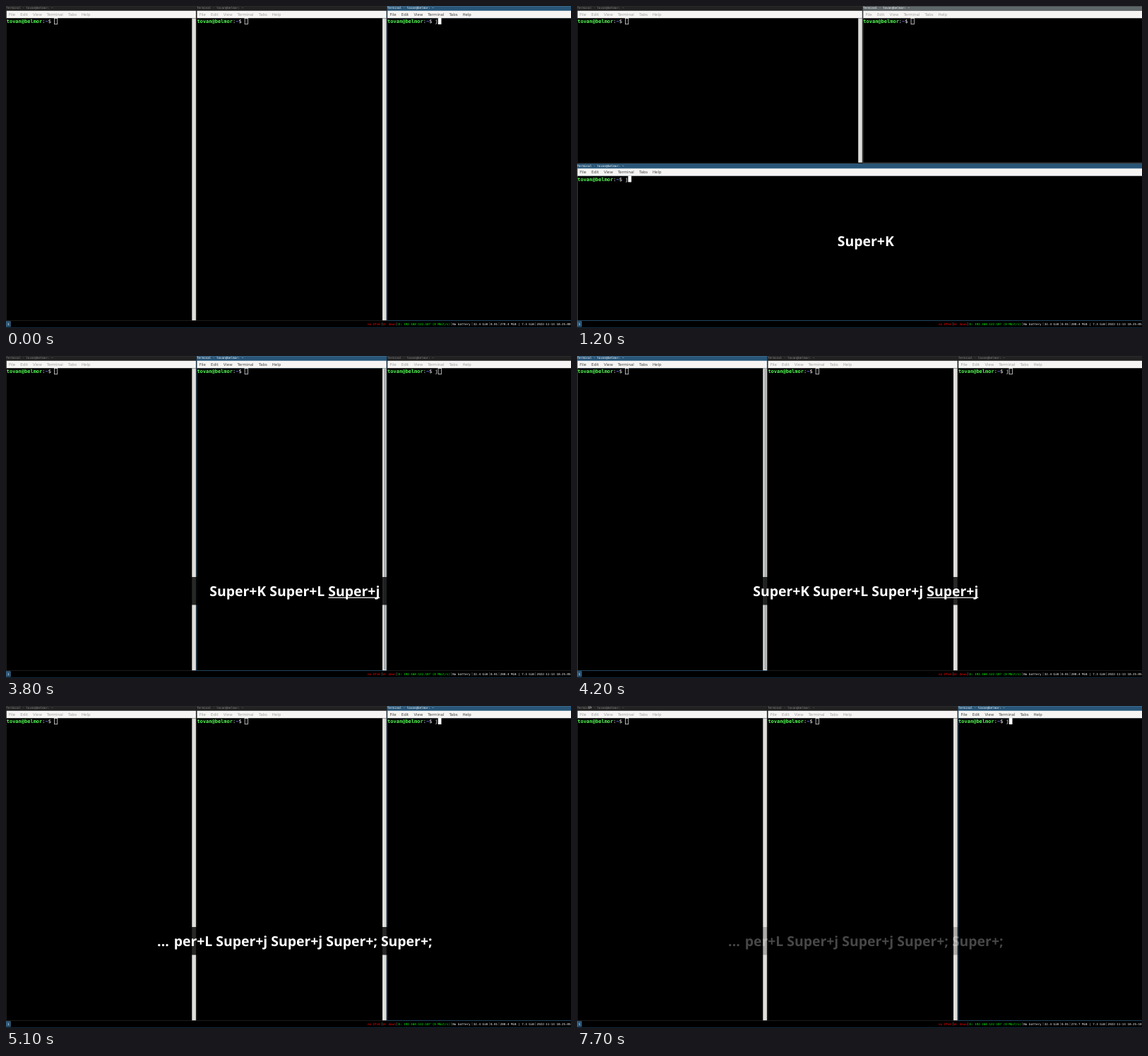
An HTML page with a canvas for the animation above (7.8 s loop, 800x456 px).

```html
<!DOCTYPE html>
<html lang="en">
<head>
<meta charset="utf-8">
<title>Tiling terminals</title>
<style>
html, body { margin: 0; width: 100%; height: 100%; overflow: hidden; background: #000; }
canvas { display: block; width: 800px; height: 456px; }
</style>
</head>
<body>
<canvas id="stage" width="800" height="456"></canvas>
<script>
const ctx = document.getElementById('stage').getContext('2d');
const LOOP = 7800, TICK = 100;
const MONO = '"DejaVu Sans Mono", monospace';
const SANS = '"DejaVu Sans", sans-serif';
const CAPTION = 'bold 19.4px "Noto Sans", "Open Sans", sans-serif';
const USER = 'tovan@belmor';
const MENU = [['File', 4], ['Edit', 20.3], ['View', 38], ['Terminal', 57.8], ['Tabs', 88], ['Help', 107]];

// Window places on a desktop that runs past the right edge: [x, y, width, height]
const COLUMNS = [[0, 0, 269.7, 446], [269.7, 0, 269.7, 446], [539.4, 0, 269.7, 446]];
const STACKED = [[0, 0, 404.6, 222.5], [404.6, 0, 404.6, 222.5], [0, 223.4, 809.2, 222.6]];

// Each key press: time, layout, focused window, older keys, newest key
const STEPS = [
  { at: -1000, layout: COLUMNS, focus: 2, old: '', key: '' },
  { at: 500, layout: STACKED, focus: 2, old: '', key: 'Super+K' },
  { at: 1800, layout: COLUMNS, focus: 2, old: 'Super+K ', key: 'Super+L' },
  { at: 3800, layout: COLUMNS, focus: 1, old: 'Super+K Super+L ', key: 'Super+j' },
  { at: 4100, layout: COLUMNS, focus: 0, old: 'Super+K Super+L Super+j ', key: 'Super+j' },
  { at: 4400, layout: COLUMNS, focus: 1, old: '...per+K Super+L Super+j Super+j ', key: 'Super+;' },
  { at: 4900, layout: COLUMNS, focus: 2, old: '...\u200a per+L Super+j Super+j Super+; ', key: 'Super+;' }
];

function rect(x, y, w, h, color) {
  ctx.fillStyle = color;
  ctx.fillRect(x, y, w, h);
}

// Small type is drawn scaled down so that its spacing stays fractional.
function text(str, x, y, size, color, family = MONO, weight = '') {
  ctx.save();
  ctx.translate(x, y);
  ctx.scale(size / 20, size / 20);
  ctx.font = `${weight} 20px ${family}`;
  ctx.fillStyle = color;
  ctx.fillText(str, 0, 0);
  const width = ctx.measureText(str).width * size / 20;
  ctx.restore();
  return x + width;
}

function prompt(x, y, typed, filled) {
  x = text(USER, x, y, 7, '#54ff54', MONO, 'bold');
  x = text(':', x, y, 7, '#fff');
  x = text('~', x, y, 7, '#7878ff', MONO, 'bold');
  x = text('$ ' + typed, x, y, 7, '#fff');
  if (filled) {
    rect(x, y - 7.1, 4.7, 8.9, '#fff');
  } else {
    ctx.strokeStyle = '#ddd';
    ctx.lineWidth = 0.8;
    ctx.strokeRect(x + 0.3, y - 6.7, 4.3, 8.2);
  }
}

function terminal([x, y, w, h], { focused, lastUsed, cursorOn, typed }) {
  const frame = focused ? '#285577' : lastUsed ? '#5f676a' : '#222';
  const edge = focused ? '#4c7899' : '#333';
  rect(x, y, w, h, frame);
  rect(x, y, w, 0.5, edge);
  rect(x, y + 6.1, w, 0.5, edge);
  text(`Terminal - ${USER}: ~`, x + 0.3, y + 4.2, 4.23, focused || lastUsed ? '#fff' : '#888');

  rect(x + 0.8, y + 6.8, w - 1.6, 10.6, '#f6f5f4');
  for (const [label, dx] of MENU)
    text(label, x + dx, y + 14, 5.45, focused ? '#444' : '#a0a09e', SANS);

  rect(x + 0.8, y + 17.4, w - 1.6, h - 18.2, '#000');
  const bar = x + w - 6.4;
  rect(bar, y + 17.4, 5.6, h - 18.2, '#dfdedb');
  if (focused) rect(bar + 2, y + 18.5, 2.6, h - 20.5, '#a9abac');
  prompt(x + 0.7, y + 24.2, typed, cursorOn);
}

function statusBar(t) {
  rect(0, 446, 800, 10, '#000');
  rect(0, 455, 800, 1, '#12283a');
  rect(0, 446.4, 6.6, 8, '#4c7899');
  rect(0.4, 446.8, 5.8, 7.2, '#285577');
  text('1', 2, 452, 4.2, '#fff');
  const [memory, seconds] = t < 1100 ? ['270.4', '00'] : t < 6200 ? ['280.4', '05'] : ['274.7', '10'];
  const fields = [
    [512, 'no IPv6', '#f00'],
    [534, 'W: down', '#f00'],
    [555.6, 'E: 192.168.122.187 (0 Mbit/s)', '#0f0'],
    [632.3, 'No battery', '#fff'],
    [661.8, '32.4 GiB', '#fff'],
    [686, '0.01', '#fff'],
    [699.8, memory + ' MiB | 7.3 GiB', '#fff'],
    [751.6, '2022-11-13 18:25:' + seconds, '#fff']
  ];
  fields.forEach(([x, label, color], i) => {
    text(label, x, 451.8, 4.2, color);
    if (i) rect(x - 2, 448, 0.4, 4.6, '#999');
  });
}

function caption(t, { old, key, at }) {
  if (!key) return;
  const fadeIn = (t - 400) / 500, fadeOut = 1 - 0.18 * (t - 7300) / TICK;
  ctx.save();
  ctx.globalAlpha = Math.min(1, fadeIn, fadeOut);
  rect(20, 313, 777, 39.5, 'rgba(0,0,0,.82)');
  ctx.font = CAPTION;
  const oldWidth = ctx.measureText(old).width, keyWidth = ctx.measureText(key).width;
  const x = 408.8 - (oldWidth + keyWidth) / 2;
  ctx.fillStyle = '#fff';
  ctx.fillText(old + key, x, 340);
  if (t < at + 200) ctx.fillRect(x + oldWidth, 341.6, keyWidth, 1.2);
  ctx.restore();
}

function pointer(t) {
  if (t < 6300) return;
  const glide = Math.min(1, (t - 6300) / 600);
  let x = 800 - 730 * glide, y = 130 * (1 - glide) ** 2;
  if (t >= 7000) x = t < 7100 ? 28 : Math.max(0, (t - 7300) / 400 * 17);
  ctx.beginPath();
  ctx.moveTo(x, y - 1);
  ctx.lineTo(x + 3.6, y + 2.2);
  ctx.lineTo(x + 1.6, y + 2.4);
  ctx.lineTo(x, y + 3.4);
  ctx.closePath();
  ctx.fillStyle = '#111';
  ctx.strokeStyle = '#ddd';
  ctx.lineWidth = 0.6;
  ctx.fill();
  ctx.stroke();
}

function draw(t) {
  const step = STEPS.findLast(({ at }) => t >= at);
  const previous = STEPS[STEPS.indexOf(step) - 1] || step;
  // The block cursor fills in shortly after the focus moves.
  const settled = step.focus === previous.focus || t >= step.at + 200;
  rect(0, 0, 800, 456, '#000');
  step.layout.forEach((box, i) => terminal(box, {
    focused: i === step.focus,
    lastUsed: step.layout === STACKED && i === 1,
    cursorOn: i === step.focus && settled,
    typed: i === 2 ? 'j' : ''
  }));
  statusBar(t);
  caption(t, step);
  pointer(t);
}

const start = performance.now();
function loop() {
  const t = (performance.now() - start) % LOOP;
  draw(Math.floor(t / TICK) * TICK);
  requestAnimationFrame(loop);
}
ctx.textRendering = 'geometricPrecision';
loop();
</script>
</body>
</html>
```
